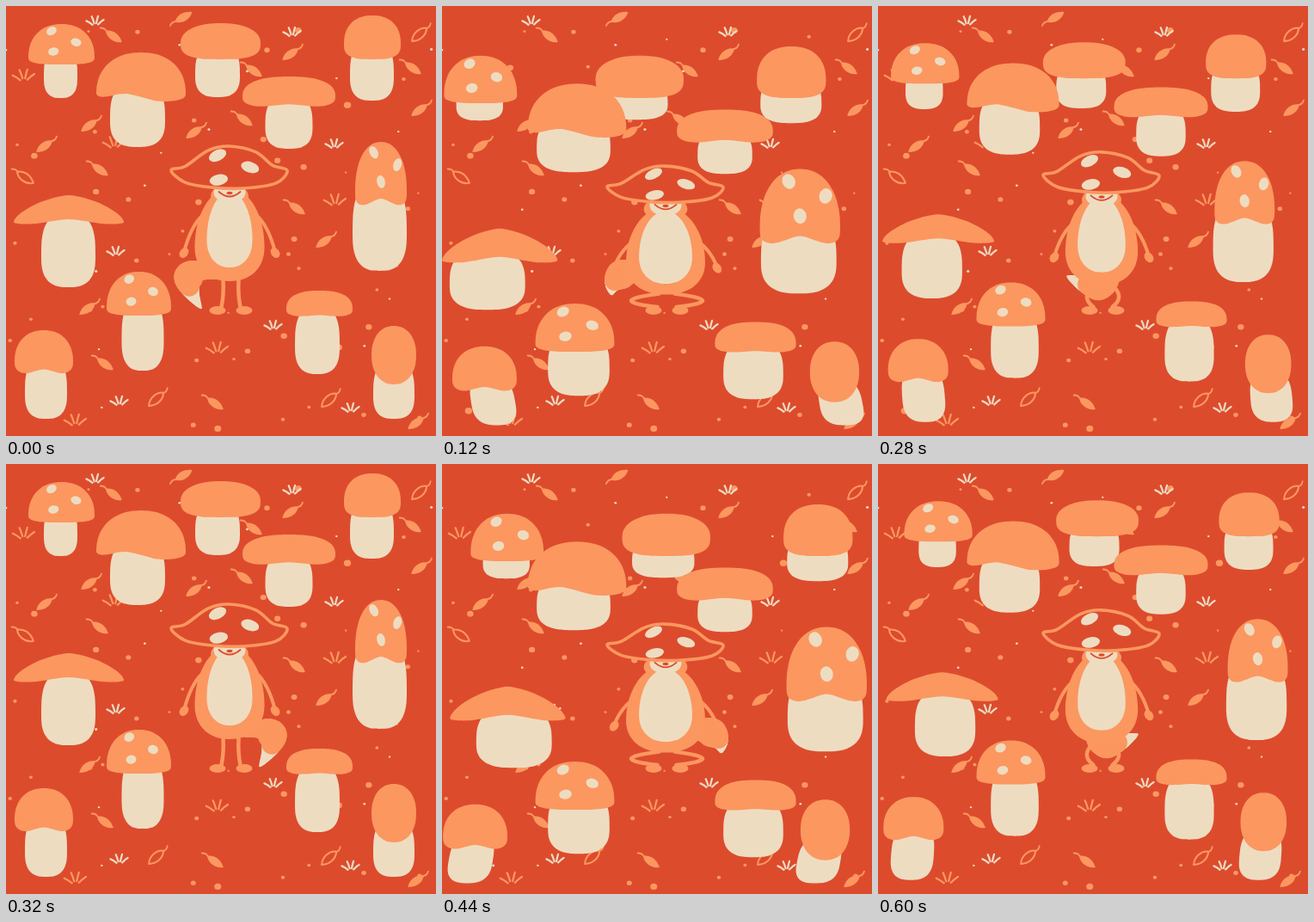
An HTML page with a canvas that plays this animation: 500x500 px, repeating every 0.64 s.

```html
<!DOCTYPE html>
<html lang="en">
<head>
<meta charset="utf-8">
<title>Dancing mushrooms</title>
<style>
html, body { margin: 0; width: 100%; height: 100%; overflow: hidden; background: #dd4b2d; }
canvas { display: block; }
</style>
</head>
<body>
<canvas id="stage" width="500" height="500"></canvas>
<script>
const ctx = document.getElementById('stage').getContext('2d');
const RED = '#dd4b2d', ORANGE = '#fc975f', CREAM = '#eedcc1';
const LOOP = 640, BOUNCE = LOOP / 2, STEP = 40;

// The beat drives everything: one bounce to each side per loop.
function beatAt(ms) {
  const t = Math.floor(ms % LOOP / STEP) * STEP;
  const u = t % BOUNCE / BOUNCE;
  return {
    u,
    side: t < BOUNCE ? -1 : 1,
    arc: Math.sin(Math.PI * u) ** .8,
    squash: Math.sin(Math.PI * u ** 1.2) ** 2,
    stretch: Math.max(0, Math.sin(2 * Math.PI * u))
  };
}

const pairs = s => s.trim().split(/\s+/).map(p => p.split(',').map(Number));
const box = (pts, x0, y0, x1, y1) => pts.map(([x, y]) => [x0 + x * (x1 - x0), y0 + y * (y1 - y0)]);

// Unit outline, widest at height `edge`; `arch` lifts the underside around `archAt`.
function outline(edge, { top = 2.2, bottom = 3, arch = 0, archAt = .5 } = {}) {
  const bend = (v, n) => Math.sign(v) * Math.abs(v) ** (2 / n);
  return Array.from({ length: 40 }, (_, i) => {
    const a = i / 20 * Math.PI, under = i < 20, n = under ? bottom : top;
    const x = .5 + bend(Math.cos(a), n) / 2;
    const y = edge + bend(Math.sin(a), n) * (under ? 1 - edge : edge);
    return [x, under ? y - arch * Math.exp(-(((x - archAt) / .25) ** 2)) : y];
  });
}

// Closed smooth curve through the points.
function blob(pts, fill) {
  const n = pts.length, p = i => pts[(i + n) % n];
  ctx.beginPath();
  ctx.moveTo(...pts[0]);
  for (let i = 0; i < n; i++) {
    const [a, b, c, d] = [p(i - 1), p(i), p(i + 1), p(i + 2)];
    ctx.bezierCurveTo(b[0] + (c[0] - a[0]) / 6, b[1] + (c[1] - a[1]) / 6,
      c[0] - (d[0] - b[0]) / 6, c[1] - (d[1] - b[1]) / 6, ...c);
  }
  ctx.closePath();
  ctx.fillStyle = fill;
  ctx.fill();
}

function oval(x, y, rx, ry, fill, turn = 0) {
  ctx.beginPath();
  ctx.ellipse(x, y, rx, ry, turn, 0, 7);
  ctx.fillStyle = fill;
  ctx.fill();
}

function curve(x0, y0, cx, cy, x1, y1, width, color = ORANGE) {
  ctx.beginPath();
  ctx.moveTo(x0, y0);
  ctx.quadraticCurveTo(cx, cy, x1, y1);
  ctx.lineWidth = width;
  ctx.strokeStyle = color;
  ctx.stroke();
}

function spots(list, [x0, y0, x1, y1], rx, ry) {
  const w = x1 - x0, h = y1 - y0;
  list.forEach(([x, y], i) =>
    oval(x0 + x * w, y0 + y * h, rx * w, ry * h, CREAM, [-.45, .3, -.2][i]));
}

// ---- Forest floor ----
const RISING = pairs('331,56 481,121 97,139 45,163 219,147 370,274 95,352 477,485');
const FALLING = pairs('125,35 288,75 473,72 109,190 277,132 338,235 115,416 243,462');
const HOLLOW = pairs('481,33 175,457 376,458');
const CREAM_GRASS = pairs('104,18 333,31 382,161 128,286 311,372 132,460 401,468');
const ORANGE_GRASS = pairs('21,83 126,161 383,228 246,400 81,484');

function leaf(x, y, deg, hollow) {
  ctx.save();
  ctx.translate(x, y);
  ctx.rotate(deg * Math.PI / 180);
  curve(10, 0, 14, 2, 18, -1, 1.8);
  ctx.beginPath();
  ctx.moveTo(-12, 0);
  ctx.bezierCurveTo(-5, -7, 6, -6, 11, 0);
  ctx.bezierCurveTo(5, 6, -4, 6, -12, 0);
  ctx.fillStyle = ORANGE;
  ctx.lineWidth = 2;
  hollow ? ctx.stroke() : ctx.fill();
  ctx.restore();
}

function grass(x, y, size, color) {
  for (const deg of [-58, -20, 14, 50]) {
    const a = deg * Math.PI / 180, dx = Math.sin(a) * size, dy = -Math.cos(a) * size;
    curve(x + dx * 4, y + 6 + dy * 4, x + dx * 8, y + 5 + dy * 8, x + dx * 12.5, y + 6 + dy * 12.5, 2.2, color);
  }
}

// Seeded crumbs on a jittered grid.
function crumbs() {
  let seed = 7;
  const random = () => (seed = seed * 16807 % 2147483647) / 2147483647;
  for (let i = 0; i < 81; i++) {
    const x = (i % 9 + random()) * 55.5, y = (Math.floor(i / 9) + random()) * 55.5;
    const r = 1.2 + 3 * random() ** 2;
    oval(x, y, r, r * .9, r < 1.7 && random() < .75 ? CREAM : ORANGE);
  }
}

function drawFloor() {
  ctx.fillStyle = RED;
  ctx.fillRect(0, 0, 500, 500);
  crumbs();
  RISING.forEach(([x, y]) => leaf(x, y, -36));
  FALLING.forEach(([x, y]) => leaf(x, y, 215));
  HOLLOW.forEach(([x, y]) => leaf(x, y, -42, true));
  leaf(206, 13, 150);
  leaf(22, 199, 215, true);
  CREAM_GRASS.forEach(([x, y]) => grass(x, y, 1, CREAM));
  ORANGE_GRASS.forEach(([x, y]) => grass(x, y, 1.25, ORANGE));
}

// ---- Mushrooms ----
const CAPS = {
  dome: outline(.82),
  slant: outline(.82, { arch: .17, archAt: .33 }),
  lens: outline(.55),
  plate: outline(.62, { top: 2.4, arch: .13 }),
  bun: outline(.65, { top: 2.3 }),
  tall: outline(.75, { bottom: 4, arch: .13 }),
  brim: outline(.88, { top: 1.5, arch: .2 }),
  wavy: outline(.68, { arch: .14 }),
  flat: outline(.7, { top: 2.5, arch: .08 }),
  egg: outline(.5, { bottom: 2.2 })
};
const STEM = outline(.58, { top: 3, bottom: 2.7 });
const DOME_SPOTS = pairs('.35,.17 .72,.45 .38,.68');
const TALL_SPOTS = pairs('.36,.16 .82,.35 .5,.61');

// `by` names the beat that drives the fall; `lag` is the cap's share of the stem's sway.
const MOVES = {
  hop: { by: 'arc', sway: 16.5, drift: -4.5, drop: 28, capDrop: 48, grow: .58, stretch: .25 },
  sink: { by: 'squash', sway: 0, drift: 0, drop: 43, capDrop: 62, grow: .5, stretch: .14 },
  lean: { by: 'arc', sway: -14.5, drift: 0, drop: 8, capDrop: 22, grow: .07, stretch: .05, skew: .7, lag: .4 }
};

const mushrooms = [];
// cap: left, top, right, bottom; stem: centre, bottom, width, all at rest.
function mushroom(shape, move, cap, stem, extra) {
  mushrooms.push({ shape: CAPS[shape], cap, stem, lag: 1, skew: 0, capGrow: .15, ...MOVES[move], ...extra });
}

mushroom('lens', 'hop', [203, 20, 296, 62], [246, 106, 52]);
mushroom('dome', 'hop', [26, 21, 103, 68], [63.5, 107, 39], { marks: DOME_SPOTS });
mushroom('slant', 'sink', [105, 54, 209, 112], [153, 164, 64]);
mushroom('plate', 'sink', [275, 82, 383, 119], [329, 166, 55], { grow: .23, capGrow: .05 });
mushroom('bun', 'hop', [393, 11, 459, 62], [425.5, 110, 51], { capGrow: .32 });
mushroom('tall', 'hop', [406, 158, 466, 234], [434.5, 308, 63], { marks: TALL_SPOTS, capGrow: .82 });
mushroom('brim', 'hop', [9, 220, 137, 255], [72.5, 327, 63], { lag: .3, capGrow: .07 });
mushroom('dome', 'sink', [117, 309, 192, 360], [159, 424, 49], { marks: DOME_SPOTS, grow: .68, capGrow: .33 });
mushroom('wavy', 'lean', [10, 377, 78, 430], [46.5, 480, 49]);
mushroom('flat', 'sink', [326, 331, 403, 362], [362, 428, 52], { capGrow: .33, stretch: .25 });
mushroom('egg', 'lean', [425, 372, 477, 440], [451, 480, 48]);

function drawMushroom(m, beat) {
  const fall = beat[m.by], shift = (beat.side * m.sway + m.drift) * beat.arc;
  const [x0, y0, x1, y1] = m.cap, [cx, bottom, width] = m.stem;
  const capHalf = (x1 - x0) / 2 * (1 + m.capGrow * beat.squash);
  const capX = (x0 + x1) / 2 + shift * m.lag, capBottom = y1 + m.capDrop * fall;
  const height = (y1 - y0) * (1 + m.stretch * beat.stretch);
  const cap = [capX - capHalf, capBottom - height, capX + capHalf, capBottom];

  const half = width / 2 * (1 + m.grow * beat.squash), x = cx + shift;
  const stem = STEM.map(([u, v]) => [u + m.skew * shift * (v - .6) / (2 * half), v]);
  blob(box(stem, x - half, capBottom - height * .38, x + half, bottom + m.drop * fall), CREAM);
  blob(box(m.shape, ...cap), ORANGE);
  if (m.marks) spots(m.marks, cap, .08, .1);
}

// ---- Fox ----
const BODY = outline(.63, { top: 2, bottom: 2.2 });
const HAT = pairs('0,.57 .12,.48 .32,.1 .5,0 .73,.14 .87,.45 1,.58 .9,.88 .62,1 .35,.98 .12,.86');
const HAT_SPOTS = pairs('.4,.22 .68,.5 .41,.8');

// Swings under the body late in each bounce, then flips to the other side.
function drawTail({ u, side, squash }) {
  const late = u ** 3, cx = 261;
  const base = [cx + side * (18 - 45 * late), 311];
  const bend = [cx + side * 72 * (1 - 1.6 * late), 298 + 60 * late];
  const tip = [cx + side * (33 + 45 * squash), 353 - 45 * u];
  const along = (v, i) => (1 - v) ** 2 * base[i] + 2 * v * (1 - v) * bend[i] + v * v * tip[i];
  for (let k = 50; k >= 0; k--) {
    const v = k / 50, r = v < .5 ? 7 + 20 * v : 17 * (2 - 2 * v) ** .75;
    oval(along(v, 0), along(v, 1), r, r, v > .7 ? CREAM : ORANGE);
  }
}

function drawFox(beat) {
  const s = beat.squash, cx = 260;
  const top = 212 + 22 * s, bottom = 320 + 23 * s, half = 40.5 + 8 * s;
  const shoulder = 248 + 38 * s, handX = 53 + 10 * s, handY = 286 + 26 * s;
  drawTail(beat);
  for (const side of [-1, 1]) {
    const x = d => cx + 1.5 + side * d;
    curve(x(9), bottom - 1, x(8 + 96 * s), (bottom + 350) / 2, x(11), 350, 4.5);
    oval(x(15.5), 354, 9.5, 5, ORANGE);
    curve(cx + side * 32, shoulder - 4, cx + side * (handX - 8), shoulder + 8, cx + side * handX, handY, 4);
    oval(cx + side * handX, handY + 1, 4.8, 6.5, ORANGE, -side * .6);
  }
  // Head and body, then chin and belly.
  oval(cx, top + 9, 22 + 5 * s, 14, ORANGE);
  blob(box(BODY, cx - half, top + 10 * s, cx + half, bottom), ORANGE);
  const belly = 26.5 + 6.5 * s;
  oval(cx, top + 5, 18.5, 12, CREAM);
  blob(box(BODY, cx - belly, top + 4 + 11 * s, cx + belly, 304 + 28 * s), CREAM);
  curve(247.5, top + 4, cx, top + 15, 272.5, top + 4, 1.8, RED);
  oval(cx, top + 5.5, 3.5, 1.7, RED);

  const hat = [192, 163 + 34 * s, 327, 212 + 24 * s];
  blob(box(HAT, ...hat), RED);
  ctx.lineWidth = 3.6;
  ctx.strokeStyle = ORANGE;
  ctx.stroke();
  spots(HAT_SPOTS, hat, .08, .13);
}

function draw(now) {
  const beat = beatAt(now);
  drawFloor();
  mushrooms.forEach(m => drawMushroom(m, beat));
  drawFox(beat);
  requestAnimationFrame(draw);
}

ctx.lineCap = ctx.lineJoin = 'round';
draw(0);
</script>
</body>
</html>
```
